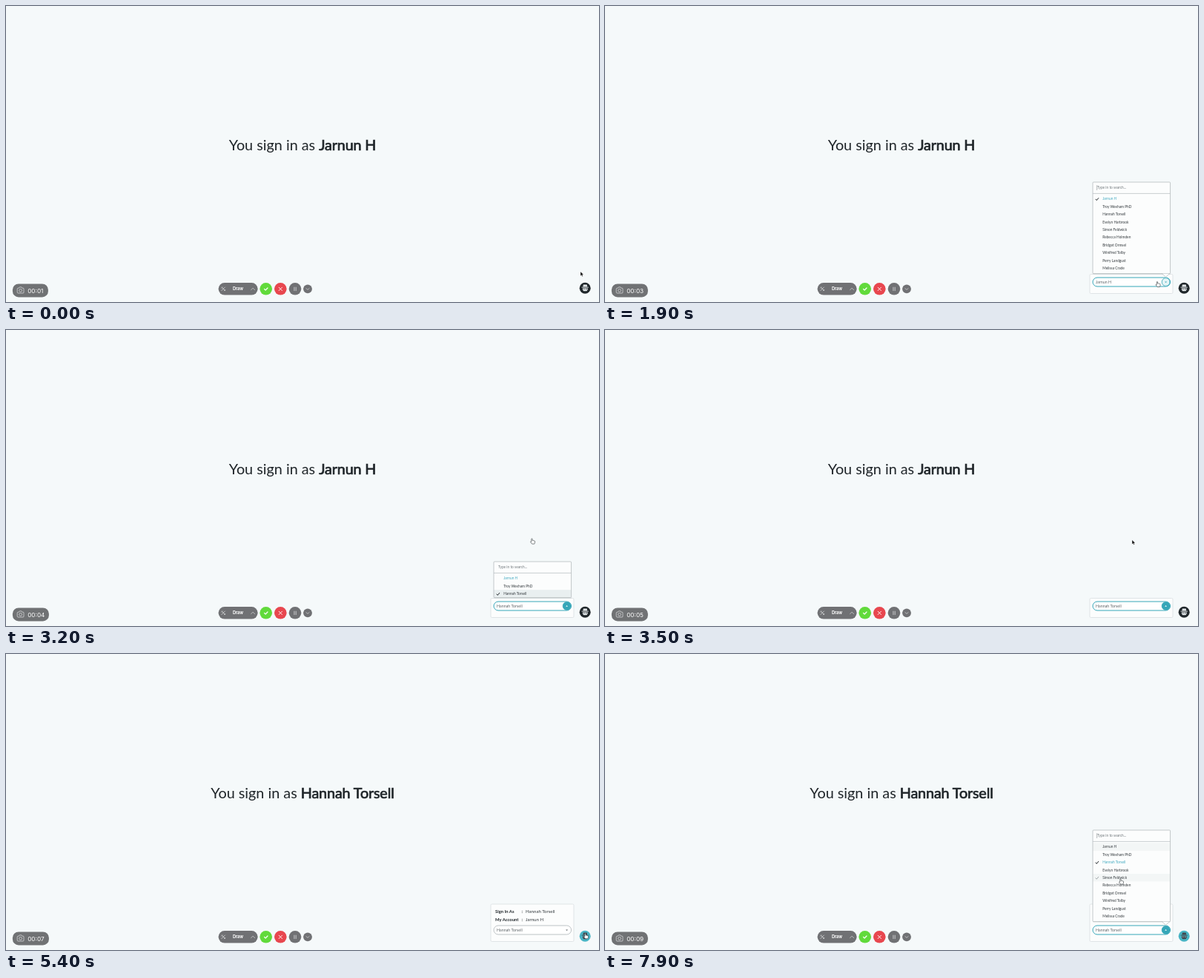
An HTML page that plays this animation: 800x400 px, repeating every 8 s.

```html
<!DOCTYPE html>
<html lang="en">
<head>
<meta charset="utf-8">
<title>Sign in as</title>
<style>
  html, body { margin: 0; width: 100%; height: 100%; overflow: hidden; background: #f5f9fa; }
  svg { display: block; width: 100%; height: 100%; font-family: Lato, "Open Sans", sans-serif; }
</style>
</head>
<body>
<svg id="stage" viewBox="0 0 800 400">
  <rect width="800" height="400" fill="#f5f9fa"/>
  <g id="scene"></g>
  <g fill="#707174">
    <rect x="286.6" y="374.1" width="53" height="16.5" rx="8.25"/>
    <circle cx="350.7" cy="382.3" r="8.3" fill="#61da3b"/>
    <circle cx="370.3" cy="382.3" r="8.3" fill="#e8474f"/>
    <circle cx="390" cy="382.3" r="8.3"/>
    <circle cx="407" cy="382.3" r="5.9"/>
  </g>
  <g fill="none" stroke="#fff" stroke-width=".9" stroke-linecap="round" stroke-linejoin="round">
    <path d="M291 380l4.6 4.6M295.4 380l-4.6 4.6M290.7 381.2l1.4-1.4M294.4 384.8l1.4-1.4" stroke="#d9dadb" stroke-width=".8"/>
    <path d="M330.6 383.6l2.5-2.4 2.5 2.4" stroke="#d9dadb" stroke-width=".7"/>
    <path d="M348.5 382.4l1.6 1.6 2.9-3" stroke-width="1.2"/>
    <path d="M368.1 380.2l4.4 4.4M372.5 380.2l-4.4 4.4"/>
    <path d="M388.9 380.1v4.6M391.2 380.1v4.6" stroke="#dedfe0" stroke-width=".8"/>
    <path d="M404.9 381.6l2.1 1.8 2.1-1.8" stroke="#d9dadb" stroke-width=".7"/>
  </g>
  <text x="313" y="384.4" font-family="Inter, sans-serif" font-size="5.6" font-weight="700" fill="#fff" text-anchor="middle">Draw</text>
  <g id="top"></g>
</svg>
<script>
const LOOP = 8000, STEP = 100;
const TEAL = '#35a6b8', INK = '#1f2529';
const people = ['Jarnun H', 'Troy Wexham PhD', 'Hannah Torsell', 'Evelyn Harbrook', 'Simon Feldwick',
  'Rebecca Holmden', 'Bridget Ormsel', 'Winifred Tolby', 'Perry Landgust', 'Melissa Crade'];

// Pointer tip: time, x, y
const path = [
  [0, 775, 359], [500, 781.5, 377.5], [850, 781.5, 377.5], [1400, 745, 372.3], [2000, 745, 372.3],
  [2700, 709.5, 281.8], [3400, 709.5, 281.8], [4300, 755, 341], [4900, 781.5, 377.5],
  [5450, 781.5, 377.5], [6000, 733, 370.5], [6700, 733, 370.5], [7600, 695.5, 303.8], [8000, 695.5, 303.8]
];
const SWITCH = 3700, PICK = 2900;
const scene = document.getElementById('scene'), overlay = document.getElementById('top');

const clamp = v => Math.max(0, Math.min(1, v));
const ramp = (t, a, b) => clamp((t - a) / (b - a));
const ease = p => p * p * (3 - 2 * p);
const within = (t, a, b) => t >= a && t < b;

function pointer(t) {
  const i = Math.max(1, path.findIndex(k => k[0] > t));
  const [t0, x0, y0] = path[i - 1], [t1, x1, y1] = path[i];
  const p = ease(ramp(t, t0, t1));
  return { x: x0 + (x1 - x0) * p, y: y0 + (y1 - y0) * p };
}

const text = (x, y, size, fill, str, extra = '') =>
  `<text x="${x}" y="${y}" font-size="${size}" fill="${fill}" ${extra}>${str}</text>`;
const rect = (x, y, w, h, attrs) => `<rect x="${x}" y="${y}" width="${w}" height="${h}" ${attrs}/>`;
const line = (d, stroke, width) =>
  `<path d="${d}" fill="none" stroke="${stroke}" stroke-width="${width}" stroke-linecap="round" stroke-linejoin="round"/>`;

function heading(name) {
  return `<text x="400" y="195" font-size="19.8" fill="${INK}" text-anchor="middle">You sign in as ` +
    `<tspan stroke="${INK}" stroke-width=".7" letter-spacing="-.15">${name}</tspan></text>`;
}

function badge(switched) {
  const c = switched ? '#40474f' : '#e0e5e7', lens = switched ? '#b9c3c8' : '#20272b';
  return `<circle cx="781.2" cy="381.2" r="7.5" fill="${switched ? '#48b4c4' : '#20272b'}"/>
    <path d="M778.3 379.6l.6-3h4.8l.6 3z" fill="${c}"/>
    ${line('M777 380.2h8.6', c, .8)}
    <path d="M778 381.3h6.6v1.9l-1.2 2h-4.2l-1.2-2z" fill="${c}"/>
    <circle cx="779.8" cy="382.4" r=".7" fill="${lens}"/><circle cx="782.8" cy="382.4" r=".7" fill="${lens}"/>`;
}

function card(switched, name, focused, hover) {
  const y = switched ? 338 : 362.5;
  let s = rect(654, y, 112, 388.5 - y, 'rx="1.5" fill="#fcfdfd" stroke="#dadfe1" stroke-width=".8"');
  if (switched) {
    [['Sign In As', people[2], 349.7], ['My Account', people[0], 361.3]].forEach(([label, who, by]) => {
      s += text(660, by, 5.9, INK, label, 'font-weight="700"') +
        text(695.6, by, 5.9, INK, ':', 'font-weight="700"') + text(701, by, 6.1, '#343a3e', who);
    });
  }
  s += rect(658, 367, 104.6, 12, `rx="6" fill="#fff" stroke="${focused ? TEAL : '#a3aaae'}" stroke-width="${focused ? 1 : .7}"`);
  if (focused) s += `<circle cx="756.6" cy="373" r="5.4" fill="${hover ? '#e4f4f6' : TEAL}" stroke="${TEAL}" stroke-width=".8"/>`;
  const mark = focused && !hover ? 'M755.2 373.7h2.8l-1.4-1.6z' : 'M755.2 372.5h2.8l-1.4 1.6z';
  return s + `<path d="${mark}" fill="${focused ? (hover ? TEAL : '#fff') : '#555c60'}"/>` +
    text(662, 374.9, 5.3, '#5b6266', name, 'letter-spacing=".03"');
}

function menu(open, h, chosen, picked, hovered, caret) {
  const y = 362 - h;
  let s = `<clipPath id="clip"><rect x="658" y="${y}" width="104.6" height="${h}"/></clipPath>` +
    rect(658.2, y + .6, 104.6, h, 'rx="1" fill="#b9bfc2" opacity=".45"') +
    rect(658, y, 104.6, h - .4, 'rx="1" fill="#fcfdfd"') + '<g clip-path="url(#clip)">';
  people.forEach((name, i) => {
    const cy = y + 22.6 + i * 10.4;
    const on = i === hovered, first = i === 0 && hovered > 0 && picked < 0;
    if (i === picked) s += rect(658, cy - 5.2, 104.6, 10.4, 'fill="#e9eff0"');
    else if (on || first) s += rect(658, cy - 5.2, 104.6, 10.4, 'fill="#f3f6f6"');
    const ticked = picked < 0 ? i === chosen : i === picked;
    if (ticked || on) s += line(`M662 ${cy + .6}l1.3 1.4 2.4-3`, ticked ? INK : '#8b9296', ticked ? 1 : .8);
    s += text(671.3, cy + 1.7, 4.8, i === chosen ? '#41a9c0' : '#343a3e', name);
  });
  s += text(664, y + 9.1, 4.8, '#70777b', 'Type in to search...');
  if (caret) s += line(`M663.6 ${y + 4.6}v6`, '#50575b', .4);
  s += line(`M658 ${y + 15.4}h104.6`, '#b3babd', .7) + '</g>' +
    rect(658, y, 104.6, h - .4, 'rx="1" fill="none" stroke="#b5bbbe" stroke-width=".8"');
  if (open) s += '<path d="M751.8 361.8h9.6l-4.8 4.4z" fill="#fcfdfd"/>' +
    line('M751.8 362l4.8 4.2 4.8-4.2', '#a9b0b3', .6);
  return s;
}

function cursor({ x, y }, hand) {
  return `<g transform="translate(${x} ${y})">` + (hand
    ? `<path d="M-.7.5q.7-1 1.3 0v2.2q.6-.5 1.2.1.6-.4 1.1.2.7-.3 1.1.5v2.1l-.7 1.7H.1L-2 4.5q.2-1.1 1.3-.2z" fill="#fff" stroke="#30363a" stroke-width=".6" stroke-linejoin="round"/>`
    : `<path d="M0 0v5.7l1.4-1.2.9 2 1-.5-.9-1.9 1.7-.1z" fill="#111" stroke="#fff" stroke-width=".3"/>`) + '</g>';
}

function timer(t) {
  const sec = Math.floor(t / 1000 + 1.65);
  const w = sec % 10 === 1 ? 48 : 49;
  return rect(8.9, 375.5, w, 17.9, 'rx="8" fill="#707274"') +
    line('M15.2 382.2q0-1 1-1h1.3l.8-1.3h2.6l.8 1.3h1.3q1 0 1 1v4.8q0 1-1 1h-6.8q-1 0-1-1z', '#e3e4e5', .7) +
    '<circle cx="19.6" cy="384.4" r="1.9" fill="none" stroke="#e3e4e5" stroke-width=".7"/>' +
    text(29.2, 387.5, 8.2, '#fff', '00:' + String(sec).padStart(2, '0'), 'font-family="Inter, sans-serif"');
}

function menuHeight(t) {
  if (t < SWITCH) return 124 * ease(ramp(t, 1500, 1800)) * (1 - ramp(t, 2900, 3396));
  return 124 * ease(ramp(t, 6100, 6400));
}

function draw(t) {
  const switched = t >= SWITCH, p = pointer(t), h = menuHeight(t);
  const cardOn = within(t, 700, SWITCH) || t >= 5000;
  const focused = within(t, 1500, SWITCH) || t >= 6100;
  const onSelect = cardOn && p.x > 658 && p.x < 762 && p.y > 366 && p.y < 379;
  const onBadge = Math.hypot(p.x - 781.2, p.y - 381.2) < 7.5;
  const picked = !switched && t > PICK ? 2 : -1;
  const full = h > 123;
  const row = Math.floor((p.y - (238 + 17.4)) / 10.4);
  const hovered = full && p.x < 762 && row >= 0 && row < people.length ? row : -1;
  const current = switched || picked === 2 ? people[2] : people[0];
  const hand = onBadge || onSelect || (full && p.y < 366) || within(t, 2500, 3400);

  scene.innerHTML = heading(people[switched ? 2 : 0]) + badge(switched) +
    (cardOn ? card(switched, current, focused, onSelect) : '') +
    (h > 1 ? menu(full, h, switched ? 2 : 0, picked, hovered, full) : '');
  overlay.innerHTML = timer(t) + cursor(p, hand);
}

let last = -1;
function tick() {
  const t = Math.floor((performance.now() % LOOP) / STEP) * STEP;
  if (t !== last) draw(last = t);
  requestAnimationFrame(tick);
}
tick();
</script>
</body>
</html>
```
